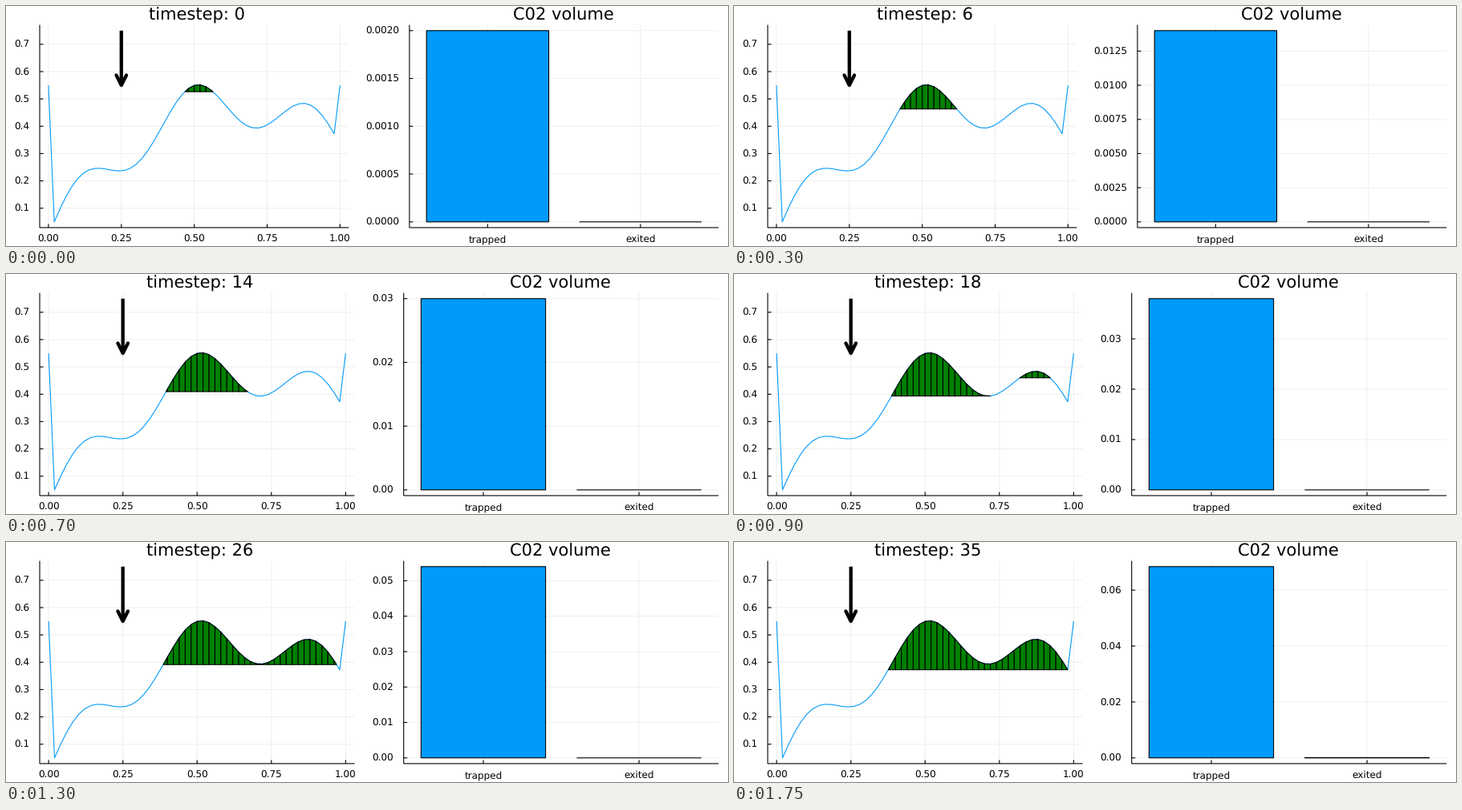
A matplotlib script for the animation above (1.8 s loop, 900 by 300 pixels).

```python
import math

import matplotlib.pyplot as plt
import numpy as np
from matplotlib.animation import FuncAnimation
from matplotlib.collections import PolyCollection
from matplotlib.patches import Rectangle

W, H, DPI = 900, 300, 100
FRAMES, INTERVAL = 36, 50
PT = 72 / DPI                      # points per pixel
BLUE, GREEN, GRID = "#009afa", "#008000", "#f0f0f0"
TOP, BOTTOM, LEFT, RIGHT = 23.6, 277.0, 42.0, 888.2
RATE, CAPACITY = 0.002, 0.0684
START, SILL, SPILL = 0.2, 0.72, 0.98

plt.rcParams.update({"font.family": "DejaVu Sans", "path.snap": False,
                     "text.hinting": "no_hinting", "text.hinting_factor": 1})

# Cap rock: a tilted pair of domes between two vertical walls
xs = np.linspace(0, 1, 51)
rock = (0.336 * xs + 0.3 * np.sin(np.pi * xs)
        + 0.0825 * np.sin(5 * np.pi * xs) - 0.001)
rock[[0, -1]] = 0.55


def height(x):
    return np.interp(x, xs, rock)


def area(level, lo, hi):
    x = np.linspace(lo, hi, 4001)
    return np.maximum(height(x) - level, 0).mean() * (hi - lo)


POROSITY = area(height(SPILL), START, SPILL) / CAPACITY
MAIN = area(height(SILL), START, SILL) / POROSITY
SIDE = area(height(SILL), SILL, SPILL) / POROSITY


def level_for(volume, lo, hi):
    low, high = height(SPILL), 0.56
    for _ in range(40):
        mid = (low + high) / 2
        if area(mid, lo, hi) > volume * POROSITY:
            low = mid
        else:
            high = mid
    return low


def pools(volume):
    """Trapped pools as (level, lo, hi)."""
    if volume <= MAIN:
        return [(level_for(volume, START, SILL), START, SILL)]
    if volume <= MAIN + SIDE:
        return [(height(SILL), START, SILL),
                (level_for(volume - MAIN, SILL, SPILL), SILL, SPILL)]
    return [(level_for(volume, START, SPILL), START, SPILL)]


def cells(level, lo, hi):
    """Grid cells between the level and the rock."""
    out = []
    for xa, xb, ha, hb in zip(xs, xs[1:], rock, rock[1:]):
        if xa < lo - 1e-9 or xb > hi + 1e-9 or max(ha, hb) <= level:
            continue
        cross = xa + (xb - xa) * (level - ha) / (hb - ha)
        if ha < level:
            xa, ha = cross, level
        elif hb < level:
            xb, hb = cross, level
        out.append([(xa, level), (xa, ha), (xb, hb), (xb, level)])
    return out


def nice_ticks(lo, hi):
    """Tick values and decimals, scored by count, zero, coverage, niceness."""
    best = (-1,)
    span = hi - lo
    power = math.floor(math.log10(span))
    for z in (power - 1, power):
        for q, nice in ((3, 0.2), (2.5, 0.5), (2, 0.7), (5, 0.9), (1, 1)):
            step = q * 10.0 ** z
            ticks = np.arange(math.ceil(lo / step), math.floor(hi / step) + 1) * step
            n = len(ticks)
            if not 4 <= n <= 8:
                continue
            score = ((1 - abs(n - 5) / 5) / 4 + (lo <= 0 <= hi) / 6
                     + span / (2 * (n - 1) * step) + nice / 4)
            if score > best[0] + 1e-9:
                best = (score, ticks, step)
    _, ticks, step = best
    digits = next(d for d in range(9) if abs(round(step, d) - step) < 1e-9)
    return ticks, digits


fig = plt.figure(figsize=(W / DPI, H / DPI), dpi=DPI, facecolor="white")
ax = fig.add_axes([0, 0, 1, 1])


def line(x, y, color="black", width=1.1, **kw):
    kw.setdefault("solid_capstyle", "butt")
    ax.plot(x, y, color=color, lw=width * PT, **kw)


def text(x, y, s, size=11.9, ha="center"):
    ax.text(x, y, s, fontsize=size * PT, ha=ha, va="baseline")


class Panel:
    def __init__(self, left, width, xlim, ylim):
        self.left, self.right = left, left + width
        self.xlim, self.ylim = xlim, ylim

    def x(self, v):
        a, b = self.xlim
        return self.left + (np.asarray(v) - a) / (b - a) * (self.right - self.left)

    def y(self, v):
        a, b = self.ylim
        return BOTTOM - (np.asarray(v) - a) / (b - a) * (BOTTOM - TOP)

    def frame(self, title, xticks, yticks, shift):
        """Grid, spines, inward ticks and labels; ticks are (value, label)."""
        for v, s in xticks:
            x = self.x(v)
            line([x, x], [TOP, BOTTOM], GRID, zorder=0)
            line([x, x], [BOTTOM, BOTTOM - 4.5])
            text(x, 295.3, s)
        for v, s in yticks:
            y = self.y(v)
            line([self.left, self.right], [y, y], GRID, zorder=0)
            line([self.left, self.left + 4.5], [y, y])
            text(self.left - 12.8, y + 4.4, s, ha="right")
        line([self.left, self.left], [TOP, BOTTOM])
        line([self.left, self.right], [BOTTOM, BOTTOM])
        text((self.left + self.right) / 2 + shift, 18, title, 20.8)


def labelled(ticks, digits):
    return [(v, f"{v:.{digits}f}") for v in ticks]


def draw_rock(p, t, volume):
    p.frame(f"timestep: {t}", labelled(*nice_ticks(*p.xlim)),
            labelled(*nice_ticks(*p.ylim)), 3.8)
    line(p.x(xs), p.y(rock), BLUE, zorder=3)
    polys = [[(p.x(x), p.y(y)) for x, y in cell]
             for pool in pools(volume) for cell in cells(*pool)]
    ax.add_collection(PolyCollection(polys, facecolor=GREEN, edgecolor="black",
                                     lw=1.1 * PT, joinstyle="round", zorder=4))
    x, tail, tip = p.x(0.25), p.y(0.75), p.y(0.55)
    line([x, x], [tail, tip], width=4.3, zorder=5)
    line([x - 6.3, x, x + 6.3], [tip - 12.6, tip, tip - 12.6], width=4.3,
         solid_capstyle="round", solid_joinstyle="round", zorder=5)


def draw_bars(p, ticks, digits, values):
    p.frame("C02 volume", [(0.5, "trapped"), (1.5, "exited")],
            labelled(ticks, digits), -0.6)
    for i, v in enumerate(values):
        x0, x1 = p.x([i + 0.1, i + 0.9])
        ax.add_patch(Rectangle((x0, p.y(0)), x1 - x0, p.y(v) - p.y(0),
                               facecolor=BLUE, edgecolor="black",
                               lw=1.1 * PT, zorder=3))


def draw(t):
    ax.clear()
    ax.set(xlim=(0, W), ylim=(H, 0))
    ax.axis("off")
    volume = min(RATE * (t + 1), CAPACITY)
    exited = 0.00005 * max(t - 33, 0)
    ylim = (-0.03 * volume, 1.03 * volume)
    ticks, digits = nice_ticks(*ylim)
    width = 399.7 - 3.6 * digits   # wider tick labels squeeze both panels
    draw_rock(Panel(LEFT, width, (-0.03, 1.03), (0.029, 0.771)), t, volume)
    draw_bars(Panel(RIGHT - width, width, (-0.0115, 2.0105), ylim),
              ticks, digits, (volume, exited))
    return []


anim = FuncAnimation(fig, draw, frames=FRAMES, init_func=lambda: [],
                     interval=INTERVAL, repeat=True, repeat_delay=0)
plt.show()
```
